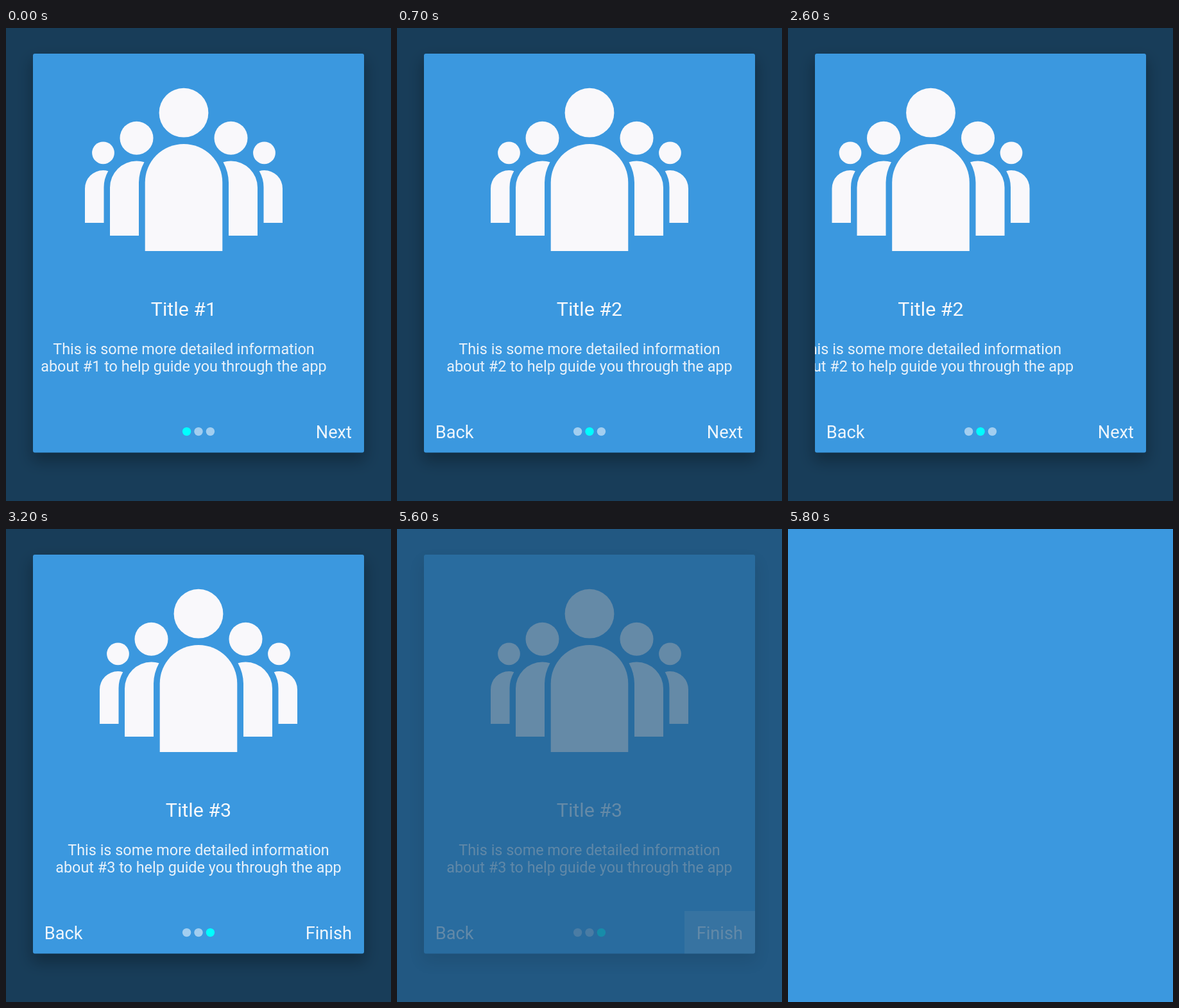
An HTML page for the animation above (5.9 s loop, 600x738 px).

```html
<!DOCTYPE html>
<html lang="en">
<head>
<meta charset="utf-8">
<title>Onboarding dialog</title>
<style>
  html, body { margin: 0; width: 100%; height: 100%; overflow: hidden; background: #3b98df; }
  svg { display: block; width: 600px; height: 738px; }
  text { font-family: Roboto, sans-serif; fill: #fff; }
  .title { font-size: 30.4px; fill: #f9f9fb; }
  .info { font-size: 23.4px; fill: #e9f2fa; }
  .nav { font-size: 27.2px; fill: #eff6fc; }
  .mid { text-anchor: middle; }
  .end { text-anchor: end; }
</style>
</head>
<body>
<svg viewBox="0 0 600 738">
  <defs>
    <filter id="blur" x="-20%" y="-20%" width="140%" height="140%">
      <feGaussianBlur stdDeviation="12"/>
    </filter>
    <clipPath id="card"><rect x="42" y="40" width="516" height="622.5" rx="3"/></clipPath>
    <g id="side">
      <circle cx="226.5" cy="171.7" r="26"/>
      <path d="M185 324V249A41.5 41.5 0 0 1 226.5 207.5Q233 207.5 238.5 209.3A70 70 0 0 0 230 241V324Z"/>
      <circle cx="174.5" cy="194.8" r="17.4"/>
      <path d="M146 304V250.5A28.5 28.5 0 0 1 174.5 222Q178.5 222 182.3 223.3A51 51 0 0 0 175.5 249V304Z"/>
    </g>
    <g id="people" fill="#f9f8fb">
      <circle cx="300" cy="132.2" r="38.4"/>
      <path d="M239.7 348V241.2A60.3 60.3 0 0 1 360.3 241.2V348Z"/>
      <use href="#side"/>
      <use href="#side" transform="translate(600) scale(-1 1)"/>
    </g>
  </defs>
  <rect width="600" height="738" fill="#3b98df"/>
  <rect id="dim" width="600" height="738"/>
  <g id="dialog">
    <rect x="40" y="50" width="520" height="626" fill-opacity=".28" filter="url(#blur)"/>
    <rect x="42" y="40" width="516" height="622.5" rx="3" fill="#3b98df"/>
    <g clip-path="url(#card)">
      <g id="pages"></g>
      <rect id="press" x="448" y="596" width="110" height="67" fill="#fff" fill-opacity=".22"/>
    </g>
    <g id="dots"></g>
    <text id="back" class="nav" x="59.8" y="640">Back</text>
    <text id="next" class="nav end" x="539" y="640"></text>
  </g>
</svg>
<script>
const LOOP = 5900, STEP = 100, PAGE = 600;
const $ = id => document.getElementById(id);

// Each swipe: start time and page offset at every step
const swipes = [
  { start: 0, path: [23, 110, 260, 430, 540, 585, 599] },
  { start: 2600, path: [77.5, 220, 400, 530, 582, 598] }
];

$('pages').innerHTML = [1, 2, 3].map((n, i) => `
  <g transform="translate(${i * PAGE})">
    <use href="#people"/>
    <text class="title mid" x="300" y="448.5">Title #${n}</text>
    <text class="info mid" x="300" y="508.5">This is some more detailed information</text>
    <text class="info mid" x="300" y="536">about #${n} to help guide you through the app</text>
  </g>`).join('');
$('dots').innerHTML = [0, 1, 2].map(i =>
  `<circle cx="${281.6 + i * 18.4}" cy="629.6" r="6.7"/>`).join('');
const dots = [...$('dots').children];

function scroll(t) {
  return swipes.reduce((x, { start, path }) => {
    if (t < start) return x;
    const i = (t - start) / STEP;
    return x + (i < path.length ? path[i] : PAGE);
  }, 0);
}

function closing(t) {
  if (t < 5600) return { dim: .6, alpha: 1 };
  if (t < 5700) return { dim: .42, alpha: .31 };
  if (t < 5800) return { dim: .15, alpha: .03 };
  return { dim: 0, alpha: 0 };
}

function draw(ms) {
  const t = Math.floor(ms % LOOP / STEP) * STEP;
  const page = t < 200 ? 0 : t < 2700 ? 1 : 2;
  const { dim, alpha } = closing(t);

  $('pages').setAttribute('transform', `translate(${-scroll(t)})`);
  dots.forEach((dot, i) => {
    dot.setAttribute('fill', i === page ? '#0ff' : '#fff');
    dot.setAttribute('fill-opacity', i === page ? 1 : .53);
  });
  $('back').setAttribute('visibility', page ? 'visible' : 'hidden');
  $('next').textContent = page < 2 ? 'Next' : 'Finish';
  $('press').setAttribute('visibility', t >= 5400 ? 'visible' : 'hidden');
  $('dim').setAttribute('opacity', dim);
  $('dialog').setAttribute('opacity', alpha);
}

const begin = performance.now();
function tick() {
  draw(performance.now() - begin);
  requestAnimationFrame(tick);
}
tick();
</script>
</body>
</html>
```
